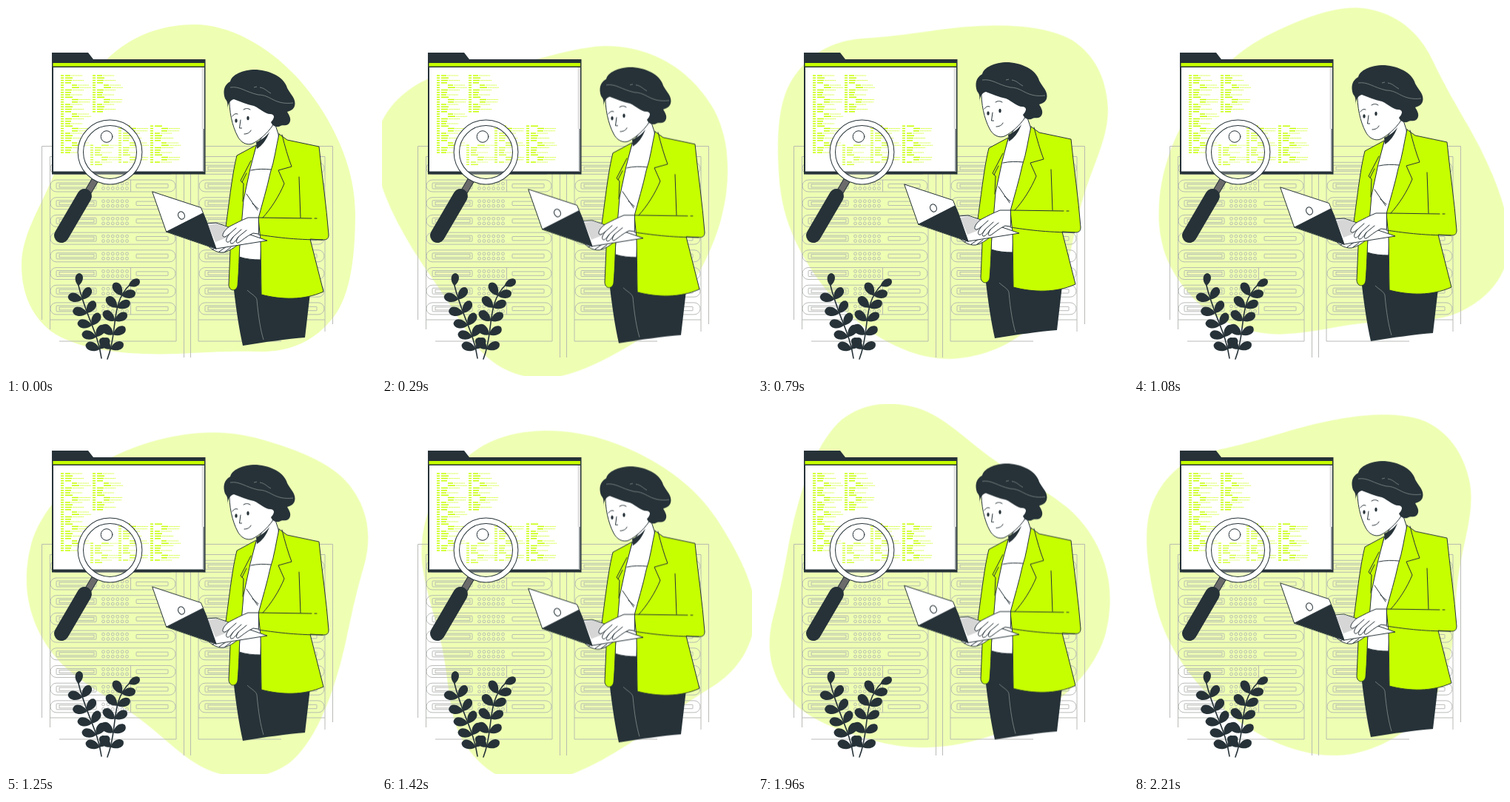
These frames come from a looping animation (500 px wide and 500 px high, 2250 ms). An HTML page:

```html
<!DOCTYPE html>
<html lang="en">
<head>
<meta charset="utf-8">
<title>Server check</title>
<style>
  html, body { margin: 0; width: 100%; height: 100%; overflow: hidden; background: #fff; }
  svg { display: block; width: 100%; height: 100%; }
  .lime { fill: #c6ff00; }
  .dark { fill: #263238; }
  .white { fill: #fff; }
  .ink { stroke: #263238; stroke-linejoin: round; stroke-linecap: round; }
  .line { fill: none; }
  .shine { fill: none; stroke: #87908f; stroke-width: .8; }
  .rack { fill: none; stroke: #b2b5b0; stroke-width: .9; }
  .code { fill: none; stroke: #c6ff00; stroke-width: 1.7; }
  .code .dots { stroke-width: 1.2; stroke-dasharray: 1.6 .7; opacity: .8; }

  #blob { fill: #eeffb3; transform-origin: 251.5px 251px; animation: spin 2250ms -4ms infinite; }
  #woman { animation: float 2250ms -4ms infinite; }

  /* 54 drawings per loop */
  @keyframes spin {
    0% { transform: rotate(0deg); animation-timing-function: step-end; }
    1.8519% { transform: rotate(0deg); animation-timing-function: steps(25); }
    48.1481% { transform: rotate(243deg); animation-timing-function: steps(28); }
    100% { transform: rotate(537deg); }
  }
  @keyframes float {
    0% { transform: translateY(0); animation-timing-function: step-end; }
    1.8519% { transform: translateY(0); animation-timing-function: steps(18); }
    35.1852% { transform: translateY(-10px); animation-timing-function: steps(18); }
    68.5185% { transform: translateY(0); animation-timing-function: steps(17); }
    100% { transform: translateY(-9.444px); }
  }
</style>
</head>
<body>
<svg viewBox="0 0 500 500">
  <path id="blob" d="M255 25C300 25 352 52 392 95C429 135 472 205 472 280C472 345 464 398 438 426C411 458 375 468 340 467C300 466 275 468 230 470C170 472 100 467 60 439C32 416 21 385 21 350C21 310 45 275 62 234C79 195 84 160 102 121C124 73 175 25 255 25Z"/>

  <g class="rack">
    <path d="M48.5 424V189.5H441.5V430M59.5 437V203.5H230V453H72M59.5 424H230M240.5 190V475M249.5 190V475M372 453H260V203.5H431V440M260 424H431"/>
    <g id="units"></g>
  </g>

  <g id="folder">
    <path class="dark" d="M62 63H111L118 72H269.5V227.5H62Z"/>
    <path class="lime" d="M63.5 77H268V81.5H63.5Z"/>
    <path class="white" d="M64 83H268V223.5H64Z"/>
    <path fill="#e0e0e0" d="M264.5 83H268V166H264.5Z"/>
    <path fill="#8d9396" d="M266 166H268V223.5H266Z"/>
    <g id="code" class="code"></g>
  </g>

  <g id="lens">
    <path d="M121 234L108 256" stroke="#263238" stroke-width="10"/>
    <path d="M121 234L108 256" stroke="#6b6b6b" stroke-width="8"/>
    <path d="M106 257L75 310" stroke="#263238" stroke-width="20" stroke-linecap="round"/>
    <circle cx="140.5" cy="197.5" r="36" fill="#fff" fill-opacity=".25"/>
    <circle class="line" cx="140.5" cy="197.5" r="39.7" stroke="#263238" stroke-width="8.4"/>
    <circle class="line" cx="140.5" cy="197.5" r="39.7" stroke="#fff" stroke-width="6.4"/>
    <circle class="white ink" cx="136" cy="176.5" r="7.8"/>
  </g>

  <g id="plants" class="dark"></g>

  <g id="woman">
    <path class="dark" d="M315 336L308 384C311 410 315 437 320 459C350 454 380 450 404 448L411 388L345 386L344 340Z"/>
    <path class="shine" d="M326 384C331 389 338 392 339 397C341 420 344 438 348 451"/>

    <!-- shirt and neck -->
    <path class="white ink" d="M338 190L361 152L368 173L372 215L346 290L344 343C334 343 324 342 315 339L319 250L330 215Z"/>
    <path class="dark" d="M338 184C345 181 351 177 356 170C352 181 346 189 339 193Z"/>
    <path class="ink line" d="M331 222C340 220 349 220 358 221M325 254L340 276M333 267L341 274"/>

    <!-- jacket -->
    <path class="lime ink" d="M338 188L312 202C306 225 302 262 297 298L303 331L301 377C302 386 311 386 313 378C315 355 315 335 316 322L321 262L330 220Z"/>
    <path class="ink line" d="M331 209L317 236L321 240L320 264M325 226L319 238"/>
    <path class="lime ink" d="M369 173L380 181L423 190C427 230 433 270 436 309C436 315 433 316 428 316L411 315L429 386C402 398 372 397 345 390L344 316L341 287C346 268 353 245 357 226C363 208 365 190 369 173Z"/>
    <path class="ink line" d="M373 174C377 190 381 204 386 217L368 222L376 240C369 257 358 274 347 286M396 231L398 286M342 286L413 287M417 287L420 287M341 309C362 312 388 316 428 316"/>

    <!-- laptop -->
    <path class="white ink" d="M268 318C274 327 284 334 294 333C302 331 308 327 314 322L298 314Z"/>
    <path class="ink line" d="M279 329L288 324M288 332L298 325M296 332L304 326"/>
    <path class="white ink" d="M271 294L284 293L353 317L284 328Z"/>
    <path fill="#d6d6d6" d="M273 296L285 294L316 306L283 319Z"/>
    <path class="white ink" d="M198 251L263.5 272.5L271 291L217 305Z"/>
    <path class="dark ink" d="M217 305L266 280L271 291L284 328Z"/>
    <ellipse class="white ink" cx="237" cy="283" rx="4.3" ry="5.3" transform="rotate(-25 237 283)"/>

    <!-- hand -->
    <path class="white ink" d="M341 286L327 286C319 289 310 294 302 298C296 302 292 308 293 311C295 314 299 310 302 308C298 313 296 318 299 319C301 320 304 316 307 312C303 318 302 321 305 321C308 321 311 316 314 312C311 317 310 321 314 320C319 317 325 311 334 307L341 308Z"/>
    <path class="ink line" d="M302 308L311 300M307 312L318 302M314 312L325 303"/>

    <!-- head -->
    <path class="white ink" d="M302 122C301 142 306 163 313 176C317 184 325 189 333 186C343 181 353 172 360 162L365 140L350 118L315 112Z"/>
    <path class="dark" d="M299 139C300 131 299 129 296 125C293 116 294 107 303 102C305 93 320 85.5 339 86C359 88 374 96 379 108C381 116 391 123 390.5 132C390 139 386 141 380 143C383 148 386 153 383 158C380 163 374 160 371 162C366 165 360 162 358 157C364 151 363 146 357 146C350 146 344 139 335 135C325 133 317 129 308 126C303 127 300 132 299 139Z"/>
    <path class="shine" d="M303 110C316 108 323 116 341 120C358 120 362 134 388 131M335 110L339 109M343 110C350 111 352 115 358 118"/>
    <path class="ink line" d="M306 149C308 146 310 145 313 146M321 140C324 138 327 138 330 140M317 154L315.5 165L318.5 165M322 173C326 173 330 171 331 168"/>
    <ellipse class="dark" cx="311" cy="155" rx="1.7" ry="2.7"/>
    <ellipse class="dark" cx="327" cy="151.5" rx="1.7" ry="2.7"/>
  </g>
</svg>
<script>
  const put = (id, html) => { document.getElementById(id).innerHTML = html; };
  const box = (x, y, w, h, r) =>
    `<rect x="${x}" y="${y}" width="${w}" height="${h}" rx="${r}"/>`;

  // Rack units
  function unit(x, y, divided) {
    let s = box(x, y - 8, 169, 16, 8) + box(x + 8, y - 4, 54, 8, 1) + box(x + 12, y - 2, 47, 4, 0);
    for (let i = 0; i < 12; i++) {
      s += `<circle cx="${x + 71.5 + (i % 6) * 6.4}" cy="${y + (i < 6 ? -3 : 3.4)}" r="1.9"/>`;
    }
    if (divided) s += `<path d="M${x + 108.5} ${y - 8}v16"/>`;
    return s + box(x + 116, y - 2.6, 43, 5.4, .5);
  }
  let units = '';
  for (let i = 0; i < 9; i++) {
    const y = 219.3 + i * 23.7, divided = i === 1 || i > 5;
    units += unit(60, y, divided) + unit(261, y, divided);
  }
  put('units', units);

  // Lines of code: gutter tick, solid word, dotted rest
  function column(x, from, to) {
    let solid = '', dots = '';
    for (let i = from; i < to; i++) {
      const indent = i % 6 < 4 ? 0 : 9;
      const word = 7 + i * 3 % 4;
      const y = 94 + i * 3.25, start = x + 6 + indent;
      solid += `M${x} ${y}h4M${start} ${y}h${word}`;
      if (indent || i % 2 === 0) dots += `M${start + word + 1} ${y}h15`;
    }
    return `<path d="${solid}"/><path class="dots" d="${dots}"/>`;
  }
  put('code', column(74, 0, 33) + column(117, 0, 16) + column(114, 29, 38) +
    column(152, 21, 37) + column(195, 21, 37));

  // Leaf growing from x, y at an angle
  function leaf(x, y, angle, size) {
    const c = Math.cos(angle) * size, s = Math.sin(angle) * size;
    const at = (a, b) => `${x + a * c - b * s} ${y + a * s + b * c}`;
    return `M${x} ${y}C${at(.35, .42)} ${at(.95, .44)} ${at(1, 0)}C${at(.95, -.34)} ${at(.35, -.42)} ${x} ${y}Z`;
  }

  // Curved stem with five pairs of leaves and one at the tip
  function plant(xs, ys) {
    const bend = ([a, b, c, d], t) =>
      a * (1 - t) ** 3 + 3 * b * t * (1 - t) ** 2 + 3 * c * t * t * (1 - t) + d * t ** 3;
    const spot = t => [bend(xs, t), bend(ys, t)];
    const angle = t => {
      const [x, y] = spot(t - .01), [X, Y] = spot(t + .01);
      return Math.atan2(Y - y, X - x);
    };
    let d = leaf(...spot(.97), angle(.97) + .3, 17);
    for (let i = 0; i < 5; i++) {
      const t = .12 + i * .175;
      d += leaf(...spot(t), angle(t) - 1.05, 20) + leaf(...spot(t), angle(t) + .88, 19);
    }
    const [p, ...rest] = xs.map((x, i) => `${x} ${ys[i]}`);
    return `<path class="ink line" stroke-width="1.6" d="M${p}C${rest}"/><path d="${d}"/>`;
  }
  put('plants', plant([129, 124, 108, 97], [476, 440, 420, 374]) +
    plant([137, 152, 140, 168], [477, 440, 402, 376]));
</script>
</body>
</html>
```
